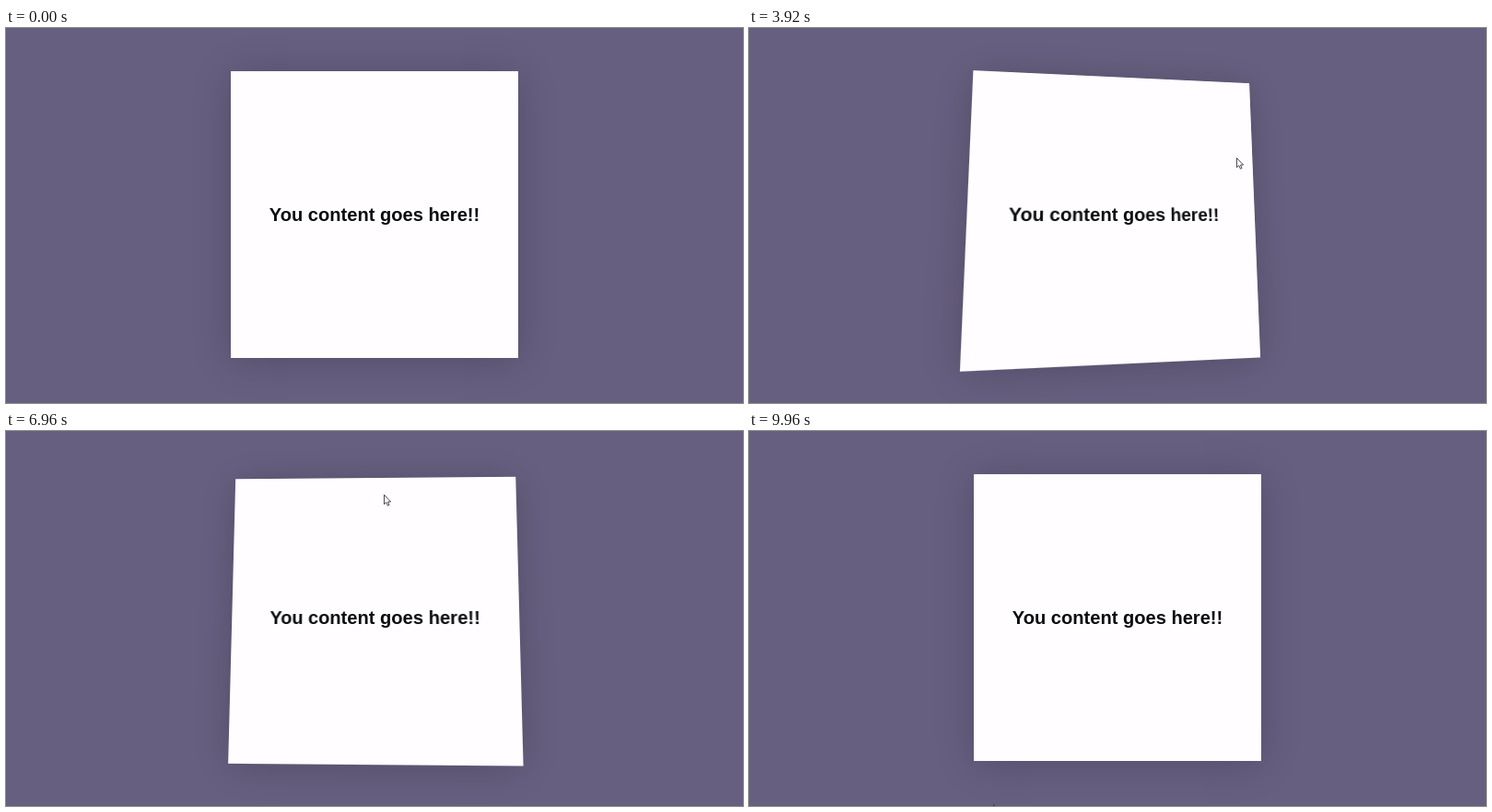
Write an HTML page that moves like this. It is 800 by 408 pixels and loops after 10000 ms.

```html
<!DOCTYPE html>
<html lang="en">
<head>
<meta charset="utf-8">
<title>Tilt card</title>
<style>
  html, body { margin: 0; width: 100%; height: 100%; overflow: hidden; background: #675f80; }
  #stage { position: relative; width: 800px; height: 408px; overflow: hidden; }
  #card {
    position: absolute; left: 244px; top: 47px; width: 312px; height: 312px;
    display: flex; align-items: center; justify-content: center;
    background: #fffdff; box-shadow: 0 3px 40px rgba(0, 0, 0, .2);
    font: bold 20.1px/1.2 "Liberation Sans", Arial, sans-serif; color: #0a0c0e; white-space: nowrap;
  }
  #pointer { position: absolute; left: 0; top: 0; width: 800px; height: 408px; }
</style>
</head>
<body>
<div id="stage">
  <div id="card">You content goes here!!</div>
  <svg id="pointer" viewBox="0 0 800 408">
    <path id="arrow" d="M.5 .5V10.7L2.8 8.6L4.4 12.2L6 11.5L4.5 8H7.6Z" fill="#fff" stroke="#2c2c2c" stroke-width=".85"/>
  </svg>
</div>
<script>
const LOOP = 10000, STEP = 40, ENTER = 1320;
const CX = 400, CY = 203, HALF = 156, DEPTH = 150;
const GAIN = 0.000362;          // edge depth per pixel of pointer offset
const LAG = 540, SAMPLES = 27;  // how long the card trails the pointer
const card = document.getElementById('card');
const arrow = document.getElementById('arrow');

// the pointer rests between moves: start, end, x, y
const home = [36, 128];
const moves = [
  [1300, 1760, 264, 68],
  [2600, 3200, 530, 70],
  [3600, 4540, 525, 335],
  [5000, 5670, 265, 342],
  [6210, 6960, 410, 69],
  [7560, 8340, 402, 333],
  [8820, 9280, 385, 408],
  [9760, 9960, 265, 406]
];

const ease = u => u * u * (3 - 2 * u);
const mix = (a, b, k) => a + (b - a) * k;

function pointer(t) {
  let [x, y] = home;
  for (const [from, to, nx, ny] of moves) {
    if (t <= from) break;
    const k = ease(Math.min(1, (t - from) / (to - from)));
    x = mix(x, nx, k);
    y = mix(y, ny, k);
  }
  return [x, y];
}

// offset from the card's centre, none while the pointer is outside
function aim(t) {
  const [x, y] = pointer(t), dx = x - CX, dy = y - CY;
  return Math.max(Math.abs(dx), Math.abs(dy)) < HALF ? [dx, dy] : [0, 0];
}

// weighted average of the recent aim
function tilt(t) {
  let sx = 0, sy = 0, sum = 0;
  for (let i = 0; i < SAMPLES; i++) {
    const u = (i + .5) / SAMPLES, w = u * (1 - u) ** 2, [dx, dy] = aim(t - u * LAG);
    sx += w * dx;
    sy += w * dy;
    sum += w;
  }
  return [sx / sum, sy / sum];
}

const angle = offset => Math.asin(offset * GAIN * DEPTH / HALF);

function draw(t) {
  const [dx, dy] = tilt(t);
  card.style.transform = dx || dy
    ? `perspective(${DEPTH}px) rotateX(${angle(-dy).toFixed(5)}rad) rotateY(${angle(dx).toFixed(5)}rad)`
    : 'none';
  const [x, y] = pointer(t).map(Math.round);
  arrow.style.display = t < ENTER ? 'none' : '';
  arrow.setAttribute('transform', `translate(${x} ${y})`);
}

const start = performance.now();
function tick() {
  const t = (performance.now() - start) % LOOP;
  draw(Math.floor(t / STEP) * STEP);
  requestAnimationFrame(tick);
}
tick();
</script>
</body>
</html>
```
